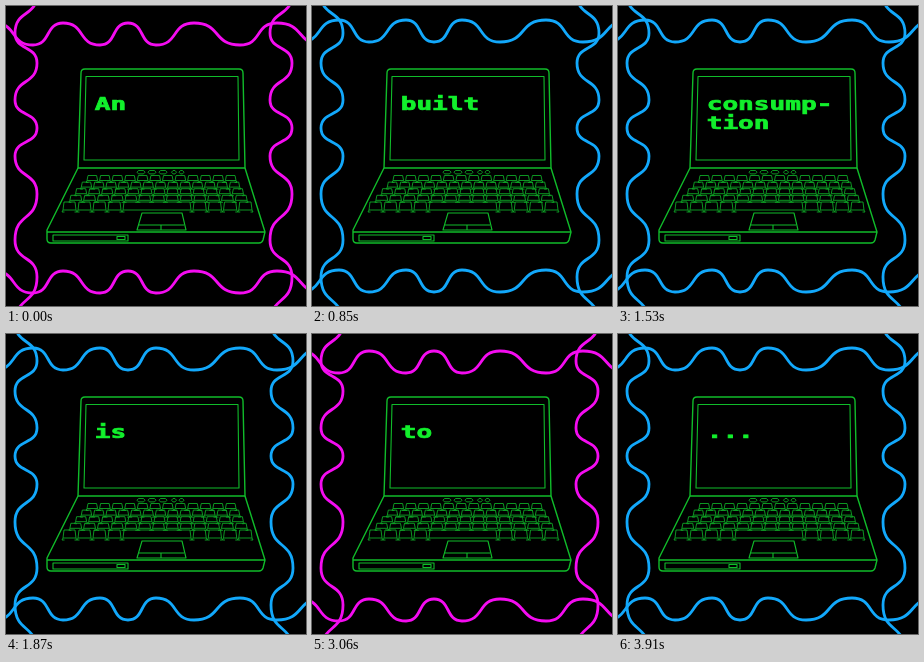
These frames come from a looping animation (300 by 300 pixels, 4080 ms). An HTML page:

```html
<!DOCTYPE html>
<html lang="en">
<head>
<meta charset="utf-8">
<title>Laptop</title>
<style>
  html, body { margin: 0; width: 100%; height: 100%; overflow: hidden; background: #000; }
  svg { display: block; width: 100vw; height: 100vh; }
  .border {
    fill: none; stroke-width: 2.8; stroke-linecap: round;
    visibility: hidden; animation: flip 340ms step-end infinite;
  }
  .pink { stroke: #f40cf0; }
  .blue { stroke: #12a8fb; animation-delay: -170ms; }
  .laptop { fill: none; stroke: #10bc2a; stroke-width: 1.1; stroke-linejoin: round; }
  .edge { stroke-width: 1.4; }
  .keys { stroke: #0fa626; stroke-width: .9; }
  .word {
    font: bold 18px "DejaVu Sans Mono", "Liberation Mono", monospace;
    fill: #12f02c; stroke: #12f02c; stroke-width: .7; visibility: hidden;
    animation: word 4080ms step-end infinite;
  }
  @keyframes flip { 0% { visibility: visible } 50%, 100% { visibility: hidden } }
  @keyframes word { 0% { visibility: visible } 8.3333%, 100% { visibility: hidden } }
</style>
</head>
<body>
<svg viewBox="0 0 300 300">
  <defs><path id="wave"/></defs>
  <rect width="300" height="300"/>

  <!-- One hand-drawn wave, turned and mirrored onto each side -->
  <g class="border blue">
    <use href="#wave" transform="matrix(0 1 1 0 9 0)"/>
    <use href="#wave" transform="matrix(0 1 1 0 265 0)"/>
    <use href="#wave" transform="matrix(1 0 0 -1 0 36)"/>
    <use href="#wave" transform="matrix(1 0 0 -1 0 286)"/>
  </g>
  <g class="border pink">
    <use href="#wave" transform="matrix(1 0 0 1 0 17)"/>
    <use href="#wave" transform="matrix(1 0 0 1 0 265)"/>
    <use href="#wave" transform="matrix(0 1 -1 0 31 0)"/>
    <use href="#wave" transform="matrix(0 1 -1 0 286 0)"/>
  </g>

  <g class="laptop">
    <path class="edge" d="M72 162L75 67Q75 63 79 63H233Q237 63 237 67L239 162Z"/>
    <path d="M80 70.500H232L233 154H78Z"/>
    <path class="edge" d="M72 162L41 224V233Q41 237 45 237H253Q256 237 257 234L259 226L239 162M41 226H259"/>
    <path d="M47 229H122V235H47ZM111 230.500H119V233.500H111Z"/>
    <path d="M136 207H176L180 224H131ZM133 219H178M155 219V224"/>
    <g class="keys">
      <path id="buttons"/>
      <path id="keys"/>
    </g>
  </g>
  <g id="words" transform="translate(88.700 104) scale(1.450 1)"></g>
</svg>
<script>
  const $ = id => document.getElementById(id);
  const times = (n, f) => Array.from({ length: n }, (_, i) => f(i)).join("");

  // The line swings between 0 and 22 at uneven turning points.
  const turns = [-12, 27, 57, 94, 122, 150, 188, 234, 271, 318];
  const swing = i => i % 2 ? 22 : 0;

  $("wave").setAttribute("d", turns.map((x, i) => {
    if (!i) return `M${x} ${swing(0)}`;
    const bend = (x - turns[i - 1]) * 0.6;
    return `C${turns[i - 1] + bend} ${swing(i - 1)} ${x - bend} ${swing(i)} ${x} ${swing(i)}`;
  }).join(""));

  $("buttons").setAttribute("d", times(5, i => {
    const x = i < 3 ? 131 + i * 11 : 165.5 + (i - 3) * 7.5, w = i < 3 ? 8 : 5;
    return `M${x + 1.5} 164.500h${w - 3}l1.500 1.700l-1.500 1.700h${3 - w}l-1.500 -1.700z`;
  }));

  // A key is a cap with two short legs below it.
  const key = (x, y, w, h) =>
    `M${x + 2} ${y}H${x + w - 2}L${x + w - 1} ${y + h - 2}H${x + 1}Z` +
    `M${x + 1} ${y + h - 2}L${x} ${y + h}h2.500M${x + w - 1} ${y + h - 2}L${x + w} ${y + h}h-2.500`;

  const row = (left, right, y, h, count) => {
    const w = (right - left) / count;
    return times(count, i => key(left + i * w, y, w, h));
  };

  $("keys").setAttribute("d",
    times(4, i => row(80 - i * 5.7, 231 + i * 3.7, 169.5 + i * 6.6, 7, i ? 13 : 12)) +
    row(56, 116, 196, 10, 4) + row(116, 186, 196, 10, 1) + row(186, 247, 196, 10, 4));

  const words = ["An", "economy", "built", "on", "consump-|tion", "is",
    "a", "bad", "way", "to", "live", "..."];

  $("words").innerHTML = words.map((word, i) =>
    `<text class="word" style="animation-delay:${(i - words.length) * 340}ms">` +
    word.split("|").map((part, n) => `<tspan x="0" y="${n * 19.5}">${part}</tspan>`).join("") +
    "</text>").join("");
</script>
</body>
</html>
```
